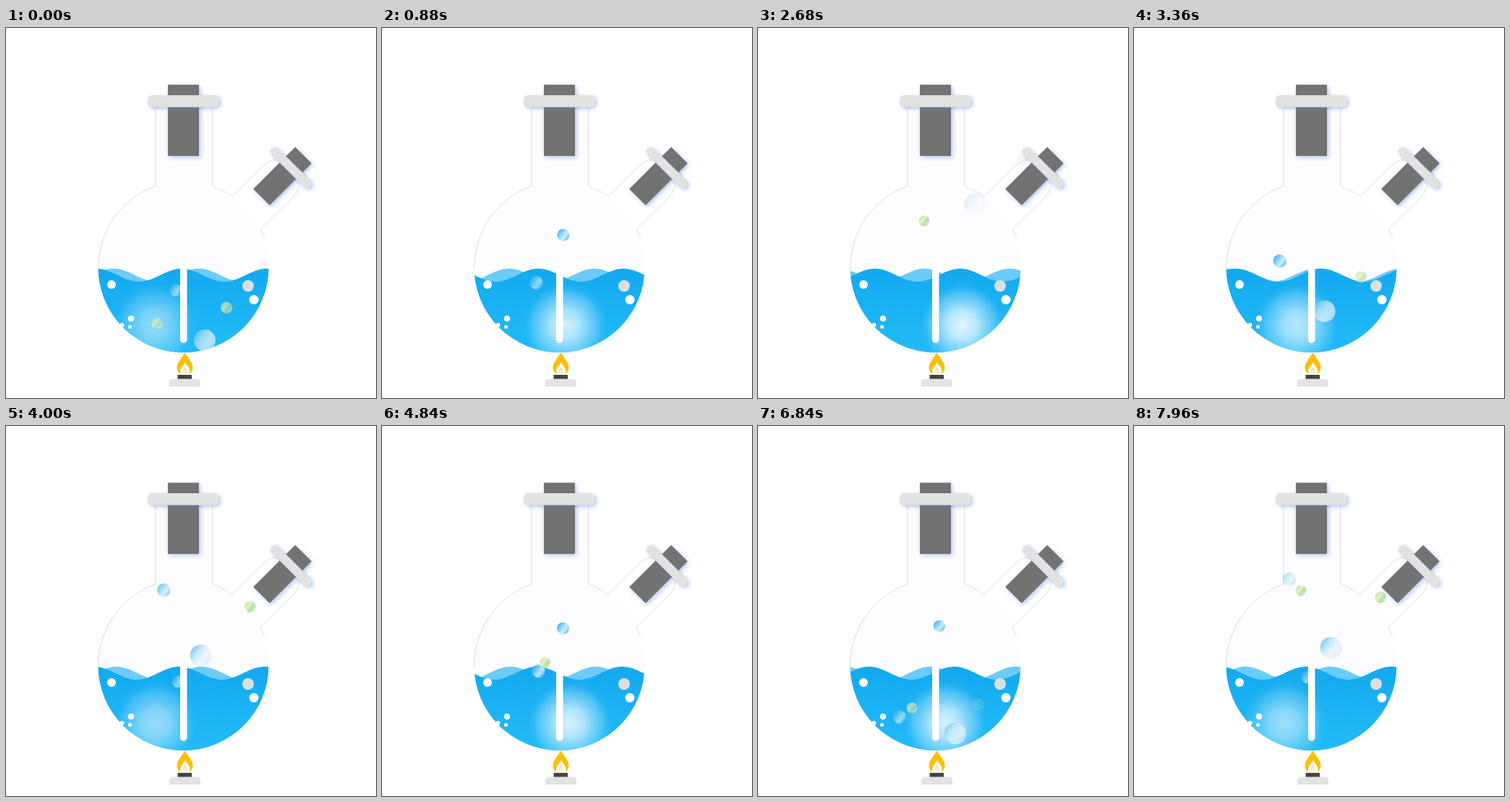
An HTML page with a canvas for the animation above (8000 ms loop, 512 by 512 pixels).

```html
<!DOCTYPE html>
<html lang="en">
<head>
<meta charset="utf-8">
<title>Bubbling flask</title>
<style>
html, body { margin: 0; width: 100%; height: 100%; overflow: hidden; background: #fff; }
canvas { display: block; width: 100vmin; height: 100vmin; margin: 0 auto; }
</style>
</head>
<body>
<canvas width="512" height="512"></canvas>
<script>
const ctx = document.querySelector('canvas').getContext('2d');
const LOOP = 8000, CYCLE = 3890, TAU = Math.PI * 2;
const FLASK = { x: 245.5, y: 331, r: 118 };
const BLUE = ['#35aee8', '#7fd0f4', '#c9edfa', '#4bb9ec'];
const GREEN = ['#bfe0a0', '#e6f1b4', '#a9d9ac', '#dff0c6'];
const BIG = ['#74c8f2', '#cbe9f9', '#f0f4fb', '#dcebf7'];

// Each bubble drifts through its path at an even pace per leg.
const bubbles = [
  { tint: BLUE, r: 8.5, start: 0, span: 1900, path: [[235, 363], [252, 310], [249, 250], [244, 170]], rests: true },
  { tint: BLUE, r: 9.2, start: 500, span: 2100, path: [[196, 425], [220, 325], [165, 271], [235, 262], [208, 195]] },
  { tint: BLUE, r: 9.2, start: 2850, span: 1300, path: [[196, 425], [195, 330], [232, 288], [211, 195]] },
  { tint: BLUE, r: 8, start: 2690, span: 520, path: [[236, 340], [251, 277], [245, 195]] },
  { tint: GREEN, r: 8, start: 1240, span: 1485, path: [[305, 387], [360, 330], [300, 292], [340, 240], [369, 176]] },
  { tint: GREEN, r: 8, start: 2930, span: 1400, path: [[305, 387], [320, 318], [354, 190]], rests: true },
  { tint: GREEN, r: 7.5, start: 1620, span: 1550, every: 2530, path: [[209, 409], [228, 318], [233, 180]], rests: true },
  { tint: BIG, r: 15, start: 1650, span: 1090, path: [[234, 430], [245, 330], [272, 290], [306, 235]] },
  { tint: BIG, r: 15, start: 2870, span: 1640, path: [[275, 432], [256, 365], [292, 240]], rests: true }
];

const clamp = v => Math.max(0, Math.min(1, v));
const mix = (a, b, k) => a + (b - a) * k;

function pointOn(path, u) {
  const s = u * (path.length - 1);
  const i = Math.min(Math.floor(s), path.length - 2);
  return [0, 1].map(axis => mix(path[i][axis], path[i + 1][axis], s - i));
}

function disc(x, y, r, fill) {
  ctx.fillStyle = fill;
  ctx.beginPath();
  ctx.arc(x, y, r, 0, TAU);
  ctx.fill();
}

function box(x, y, w, h, r, fill) {
  ctx.fillStyle = fill;
  ctx.beginPath();
  ctx.roundRect(x, y, w, h, r);
  ctx.fill();
}

function shape(d, fill) {
  ctx.fillStyle = fill;
  ctx.fill(new Path2D(d));
}

function shade(blur) {
  ctx.shadowColor = 'rgba(80,125,225,.45)';
  ctx.shadowBlur = blur;
  ctx.shadowOffsetX = ctx.shadowOffsetY = 2;
}

function drawGlass() {
  disc(FLASK.x, FLASK.y, FLASK.r, '#fdfcfe');
  box(207, 108, 79, 115, 0, '#fdfcfe');
  ctx.lineWidth = 0.8;
  ctx.strokeStyle = '#d2d2d6';
  ctx.stroke(new Path2D(
    'M206.8 108V219C160 235 127.5 280 127.5 334' +
    'M285.8 108V219Q300 224 313 233L353 193Q363 183 374 182' +
    'M358 291L352 278L398 233Q406 224 406 211'));
}

function drawStopper(w, top, h, flangeY, flangeW, flangeH) {
  ctx.save();
  shade(6);
  box(-w / 2, top, w, h, 0, '#727272');
  shade(5);
  box(-flangeW / 2, flangeY, flangeW, flangeH, flangeH / 2 - 1, '#e2e2e2');
  ctx.restore();
}

function drawStoppers() {
  ctx.save();
  ctx.translate(245.5, 0);
  drawStopper(43, 78.5, 98.5, 93, 99.5, 16.5);
  ctx.restore();
  ctx.save();
  ctx.translate(411.5, 176);
  ctx.rotate(Math.PI / 4);
  drawStopper(32, 0, 82, 18, 75, 12.5);
  ctx.restore();
}

function wave(crest, base, fill) {
  ctx.fillStyle = fill;
  ctx.beginPath();
  ctx.moveTo(120, 460);
  for (let x = 120; x <= 372; x += 2)
    ctx.lineTo(x, base - 9 * Math.cos((x - crest) / 118 * TAU));
  ctx.lineTo(372, 460);
  ctx.fill();
}

function drawGlow(swing) {
  const x = mix(206, 318, swing), y = 411;
  const power = mix(0.52, 0.96, Math.sqrt(swing));
  const glow = ctx.createRadialGradient(x, y, 0, x, y, 58);
  glow.addColorStop(0, `rgba(255,255,255,${power})`);
  glow.addColorStop(0.35, `rgba(240,250,255,${power * 0.82})`);
  glow.addColorStop(0.75, `rgba(190,232,253,${power * 0.4})`);
  glow.addColorStop(1, 'rgba(90,200,250,0)');
  disc(x, y, 58, glow);
}

function drawLiquid(t) {
  const p = t % CYCLE / CYCLE;
  const depth = ctx.createLinearGradient(0, 335, 0, 449);
  depth.addColorStop(0, '#14a9ef');
  depth.addColorStop(1, '#22bbf8');
  ctx.save();
  ctx.beginPath();
  ctx.arc(FLASK.x, FLASK.y, FLASK.r, 0, TAU);
  ctx.clip();
  wave(149 + 118 * p, 342, '#6accf7');
  wave(243 - 118 * p, 342, depth);
  drawGlow((1 - Math.cos(p * TAU)) / 2);
  ctx.restore();
}

function drawBubble({ tint, r, path }, u, alpha) {
  const [x, y] = pointOn(path, u);
  const g = ctx.createLinearGradient(x - r * 0.8, y - r * 0.6, x + r * 0.8, y + r * 0.6);
  tint.forEach((c, i) => g.addColorStop(i / 3, c));
  ctx.globalAlpha = alpha * (y > 340 ? 0.7 : 0.9);
  disc(x, y, r, g);
  ctx.globalAlpha = 1;
}

function drawBubbles(t) {
  for (const b of bubbles) {
    if (b.rests) drawBubble(b, 0, clamp(1 - t / 250));
    for (let age = t - b.start; age >= 0; age -= b.every || CYCLE)
      if (age < b.span)
        drawBubble(b, age / b.span, clamp(age / 80) * clamp((b.span - age) / 200));
  }
}

function drawDetails() {
  disc(146, 355, 6, '#fff');
  disc(335, 357, 8, '#dcdfe2');
  disc(343, 376, 6.5, '#fff');
  disc(173, 402, 4.3, '#fff');
  disc(160.5, 411, 3, '#fff');
  disc(171.5, 413.5, 2.6, '#fff');
  box(241, 326, 9.5, 110, 4.7, '#fff');
}

function drawBurner() {
  shape('M247.5 449C251 456 258.5 462 258.5 470C258.5 475 255 479 250 480H245C240 479 236.5 475 236.5 470C236.5 462 244 456 247.5 449Z', '#fbbf08');
  shape('M248 462C250 467 254.5 470 254.5 475C254.5 478 252 480 250 480H245C243 480 241 478 241 475C241 470 246 467 248 462Z', '#fff');
  shape('M247.5 469Q251 474 248.8 480H246.2Q244.5 474 247.5 469Z', '#f7d477');
  shape('M247.5 471Q249.5 475 248.3 480H246.8Q245.8 475 247.5 471Z', '#fff');
  box(237.5, 480, 19.5, 6, 0, '#424242');
  box(226, 485.5, 43, 10.8, [5, 5, 0, 0], '#e3e3e3');
}

function draw(t) {
  ctx.fillStyle = '#fff';
  ctx.fillRect(0, 0, 512, 512);
  drawGlass();
  drawLiquid(t);
  drawBubbles(t);
  drawDetails();
  drawStoppers();
  drawBurner();
}

const start = performance.now();
function tick() {
  draw((performance.now() - start) % LOOP);
  requestAnimationFrame(tick);
}
tick();
</script>
</body>
</html>
```
